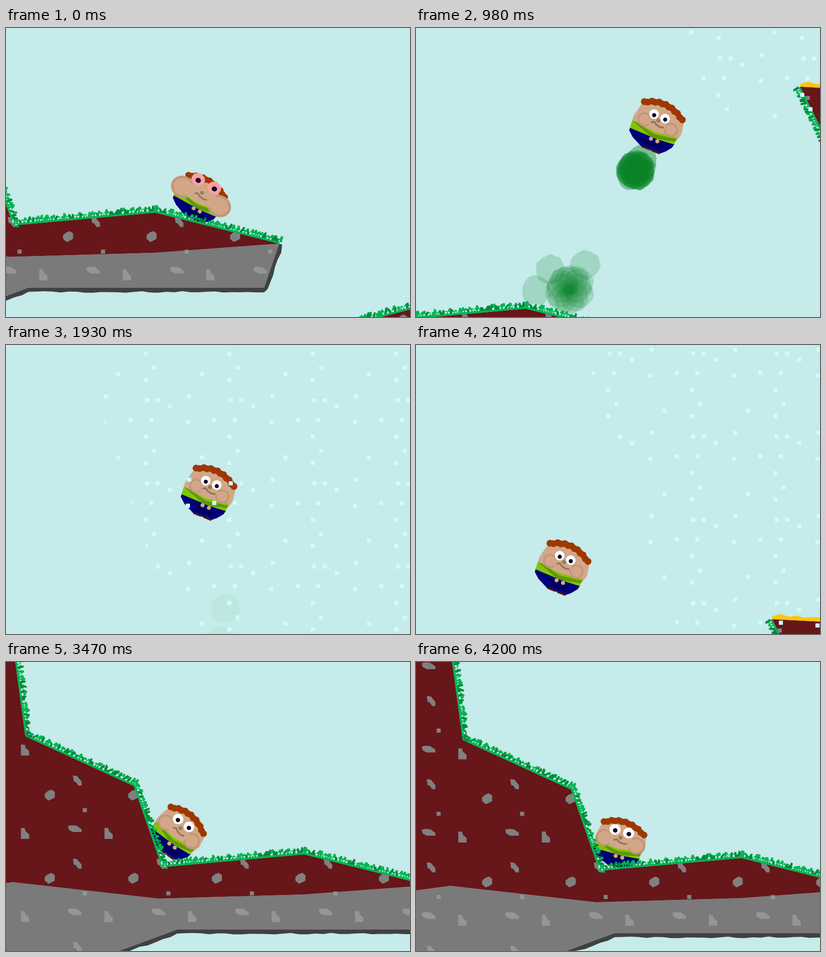
An HTML page with a canvas that plays this animation: 883 px wide and 634 px high, repeating every 4240 ms.

```html
<!DOCTYPE html>
<html lang="en">
<head>
<meta charset="utf-8">
<title>Jelly jumper</title>
<style>
html, body { margin: 0; width: 100%; height: 100%; overflow: hidden; background: #c5ebea; }
canvas { display: block; }
</style>
</head>
<body>
<canvas id="stage" width="883" height="634"></canvas>
<script>
const W = 883, H = 634, LOOP = 4240, TILE = 182.6;
const ctx = document.getElementById('stage').getContext('2d');

let seed = 7;
const rand = () => { seed = (seed * 16807) % 2147483647; return seed / 2147483647; };
const lerp = (a, b, k) => a + (b - a) * k;

// time, hilltop on screen (x, y), hero in the world (x, y), angle, squash
const keys = [
  [0, 326, 405, 99, -33, 28, 1],
  [540, 318, 402, 93, -40, 25, .6],
  [620, 308, 414, 112, -100, 23, 0],
  [980, 240, 615, 287, -400, 22, 0],
  [1480, -10, 1027, 507, -782, 23, 0],
  [1640, -45, 1135, 528, -858, 23, 0],
  [2000, 30, 1200, 400, -860, 22, 0],
  [2410, 178, 1089, 143, -601, 22, 0],
  [2800, 335, 705, -20, -216, 21, 0],
  [2930, 430, 590, -85, -55, 10, .5],
  [3180, 567, 470, -180, -38, -198, .1],
  [3470, 651, 422, -275, -47, -324, .25],
  [3750, 703, 428, -268, -35, -342, .35],
  [4200, 711, 430, -265, -33, -345, .35],
  [4240, 711, 430, -265, -33, -345, .35]
];

function pose(t) {
  let i = 0;
  while (i < keys.length - 2 && t >= keys[i + 1][0]) i++;
  const a = keys[i], b = keys[i + 1], span = b[0] - a[0], k = (t - a[0]) / span;
  const slope = (n, j) => {
    const p = keys[n - 1], q = keys[n + 1];
    return p && q ? (q[j] - p[j]) / (q[0] - p[0]) * span : 0;
  };
  return a.map((v, j) => {
    if (j === 6) return lerp(v, b[j], k);
    const m = slope(i, j), n = slope(i + 1, j), d = b[j] - v;
    return v + k * (m + k * (3 * d - 2 * m - n + k * (m + n - 2 * d)));
  });
}

function path(...pts) {
  const p = new Path2D();
  pts.forEach(([x, y]) => p.lineTo(x, y));
  p.closePath();
  return p;
}
function fill(shape, color) { ctx.fillStyle = color; ctx.fill(shape); }
function disc(x, y, r, color, ry = r) {
  ctx.beginPath();
  ctx.ellipse(x, y, r, ry, 0, 0, 7);
  ctx.fillStyle = color;
  ctx.fill();
}

// Calls visit(x, y, normalX, normalY) at even steps along a line
function along(pts, step, visit) {
  for (let i = 1; i < pts.length; i++) {
    const [x, y] = pts[i - 1], dx = pts[i][0] - x, dy = pts[i][1] - y;
    const len = Math.hypot(dx, dy), n = Math.ceil(len / step);
    for (let j = 0; j <= n; j++) visit(x + dx * j / n, y + dy * j / n, dy / len, -dx / len);
  }
}
function strip(pts, height, rough) {
  const edge = [];
  along(pts, 18, (x, y, nx, ny) => {
    const h = height + (rand() - .5) * rough;
    edge.push([x + nx * h, y + ny * h]);
  });
  return path(...pts, ...edge.reverse());
}
function grass(pts) {
  const light = strip(pts, 8, 2), dark = new Path2D();
  along(pts, 5.5, (x, y, nx, ny) => {
    const shade = rand() < .33, h = 11 + rand() * 7, lean = rand() * 9 - 2, w = shade ? 3 : 5;
    const at = (u, v) => [x - ny * u + nx * v, y + nx * u + ny * v];
    (shade ? dark : light).addPath(path(at(-w, 4), at(lean - 2, h), at(lean + 2, h - 1), at(w, 4)));
  });
  return [light, dark];
}

const slope = [[-660, -640], [-632, -430], [-609, -259], [-372, -150], [-310, 28], [0, 0], [271, 68]];
const seam = [[271, 68], [0, 88], [-318, 97], [-636, 61], [-711, 71], [-1100, 110]];
const under = [[271, 68], [238, 165], [-278, 165], [-1100, 470]];
const cliff = [[760, -167], [600, -487]];
const beach = [[600, -487], [1400, -446]];
const ledge = [[449, 240], [494, 229], [700, 175]];

const hillDirt = path(...slope, ...seam, [-1100, -640]);
const hillRock = path(...seam, ...under.slice().reverse());
const cliffDirt = path(...cliff, ...beach, [1400, -167]);
const ledgeDirt = path(...ledge, [700, 700], [449, 700]);
const rim = strip(under, 9, 4), sand = strip(beach, 9, 6);
const lawns = [slope, cliff, ledge].map(grass);

const pebbles = new Path2D();
const pebble = (x, y, pts) => pebbles.addPath(path(...pts.map(([u, v]) => [x + u, y + v])));
pebble(-373, -130, [[-4, -9], [4, -12], [11, -7], [11, 5], [4, 9], [-3, 12], [-11, 5], [-11, -3]]);
pebble(-495, -162, [[-10, -11], [-1, -10], [9, 2], [9, 11], [2, 11], [-4, 3], [-8, 2]]);
pebble(-479, -97, [[-4.5, -4.5], [4.5, -4.5], [4.5, 4.5], [-4.5, 4.5]]);
pebble(-501, -56, [[-15, -6], [-7, -8], [4, -7], [15, 1], [15, 7], [-4, 7], [-13, 2]]);
pebble(-427, -46, [[-9, -12], [-1, -12], [1, -5], [9, 2], [9, 12], [-9, 12]]);

const flakes = new Path2D();
[[0, 0], [23, 0], [49, 14], [-63, -57], [-91, -8], [-36, 43], [9, 43], [-3, -45], [-3, 80], [15, -71], [89, 49]]
  .forEach(([x, y]) => flakes.rect(x - 4.5, y - 4.5, 9, 9));
const snowArea = path([409, -417], [2000, -417], [2000, -1900], [-85, -1900]);

// Repeats a tile shape over the visible part of an area
function tiled(area, shape, color, ox, oy, camX, camY) {
  const first = (o, cam) => o + (Math.floor((-cam - o) / TILE) - 1) * TILE;
  const x0 = first(ox, camX), y0 = first(oy, camY);
  ctx.save();
  ctx.clip(area);
  for (let x = x0; x < W - camX + 700; x += TILE)
    for (let y = y0; y < H - camY + 400; y += TILE) {
      ctx.save();
      ctx.translate(x, y);
      fill(shape, color);
      ctx.restore();
    }
  ctx.restore();
}

function ground(camX, camY) {
  const soil = (area, base, spots) => {
    fill(area, base);
    tiled(area, pebbles, spots, 0, 0, camX, camY);
  };
  fill(rim, '#414141');
  soil(hillRock, '#7a7a7a', '#959595');
  [hillDirt, cliffDirt, ledgeDirt].forEach(a => soil(a, '#67161a', '#808080'));
  fill(sand, '#ffc40a');
  lawns.forEach(([light, dark]) => { fill(light, '#00b451'); fill(dark, '#008a3b'); });
}

const puff = path(...Array.from({ length: 26 }, (_, i) => {
  const r = 30 + rand() * 5, a = i / 26 * Math.PI * 2;
  return [Math.cos(a) * r, Math.sin(a) * r];
}));
// Each burst: birth, place, size of the cluster, its spread, and stray puffs
const bursts = [
  [560, 95, -45, 12, 26, [[-40, -40], [35, -50], [-70, 5]]],
  [925, 240, -303, 14, 38, [[40, -70]]],
  [1130, 360, -497, 8, 50, []],
  [1250, 463, -515, 0, 0, [[5, -82], [-3, -27], [17, 48], [-18, 68]]]
].map(([born, x, y, n, spread, stray]) => ({
  born, x, y,
  parts: stray.concat(Array.from({ length: n }, (_, i) => {
    const a = i / n * Math.PI * 2, d = spread * (.6 + .4 * rand());
    return [Math.cos(a) * d, Math.sin(a) * d];
  }))
}));

function smoke(t) {
  for (const b of bursts) {
    const age = t - b.born;
    if (age < 0 || age > 750) continue;
    const k = Math.sqrt(age / 400);
    ctx.globalAlpha = .45 * (1 - age / 750);
    b.parts.forEach(([dx, dy], i) => {
      ctx.save();
      ctx.translate(b.x + dx * k, b.y + dy * k);
      ctx.rotate(i);
      fill(puff, '#0a8228');
      ctx.restore();
    });
  }
  ctx.globalAlpha = 1;
}

const body = {
  face: path([-55, 14], [-56, -3], [-50, -30], [-42, -42], [0, -46], [40, -40], [52, -25], [56, -2], [51, 14], [0, 20]),
  trousers: path([-54, 24], [50, 22], [48, 32], [38, 45], [28, 54], [-14, 55], [-40, 43], [-53, 32]),
  crease: path([-26, 33], [30, 35], [24, 44], [-6, 46]),
  shoes: path([-14, 52], [28, 51], [28, 56], [9, 56], [8, 53], [5, 53], [4, 56], [-14, 56]),
  scarf: path([-55, 9], [0, 14], [50, 7], [49, 24], [10, 27], [-54, 26]),
  fold: path([-54, 9], [-46, 9], [0, 19], [44, 12], [50, 11], [50, 17], [8, 27], [-4, 27])
};
const mouth = new Path2D('M-16-3L-9-6L-3-2L6 0L15-2');

function hero(x, y, angle, s, hurt) {
  const skin = '#d2a788';
  ctx.save();
  ctx.translate(x, y);
  ctx.rotate(angle * Math.PI / 180);
  ctx.scale(1, 1 - .1 * s);
  fill(body.trousers, '#00007c');
  fill(body.crease, '#00005a');
  fill(body.shoes, '#501418');
  fill(body.face, skin);
  for (let i = 0; i <= 12; i++) {
    const u = i / 6 - 1;
    disc(u * 46, -51 + 15 * u * u + 3 * u + (i % 2) * 2 + s * 4, 7.5, '#9e3800');
  }
  fill(body.scarf, '#84c400');
  fill(body.fold, '#629808');
  for (const side of [-1, 1]) {
    disc(side * (31 + 14 * s), -3, 15.5 + 11 * s, '#c1977a');
    disc(side * (31 + 14 * s), -3, 11.5 + 9 * s, skin);
  }
  disc(-1, -5, 20 + 25 * s, skin, 16 + 4 * s);
  const eye = 10.5 + 4.5 * s, tint = Math.round(255 - 95 * hurt);
  for (const side of [-1, 1]) {
    const ex = -3 + side * (13 + 7 * s), ey = -21.5 - 15 * s;
    disc(ex, ey, eye, `rgb(255,${tint},${tint})`);
    disc(ex + 1, ey + 2, 4.5 + 1.5 * s, '#0a0a30');
  }
  disc(-2, -12, 4.5, '#987b62');
  ctx.strokeStyle = '#94785f';
  ctx.lineWidth = 4;
  ctx.stroke(mouth);
  disc(-2, 31, 4.5, skin);
  disc(13, 31, 4.5, skin);
  ctx.restore();
}

function draw(t) {
  const [, camX, camY, x, y, angle, squash] = pose(t);
  ctx.fillStyle = '#c5ebea';
  ctx.fillRect(0, 0, W, H);
  ctx.save();
  ctx.translate(camX, camY);
  smoke(t);
  hero(x, y, angle, squash, Math.max(0, 1 - t / 500));
  ground(camX, camY);
  const wind = t < 1480 ? lerp(-175, -252, (t - 980) / 500) : lerp(-252, -355, (t - 1480) / 930);
  const fall = -62 + .0187 * (t - 980);
  tiled(snowArea, flakes, '#cbfffb', 600 + wind, -487 + fall, camX, camY);
  ctx.restore();
}

const start = performance.now();
function tick() {
  draw((performance.now() - start) % LOOP);
  requestAnimationFrame(tick);
}
tick();
</script>
</body>
</html>
```
